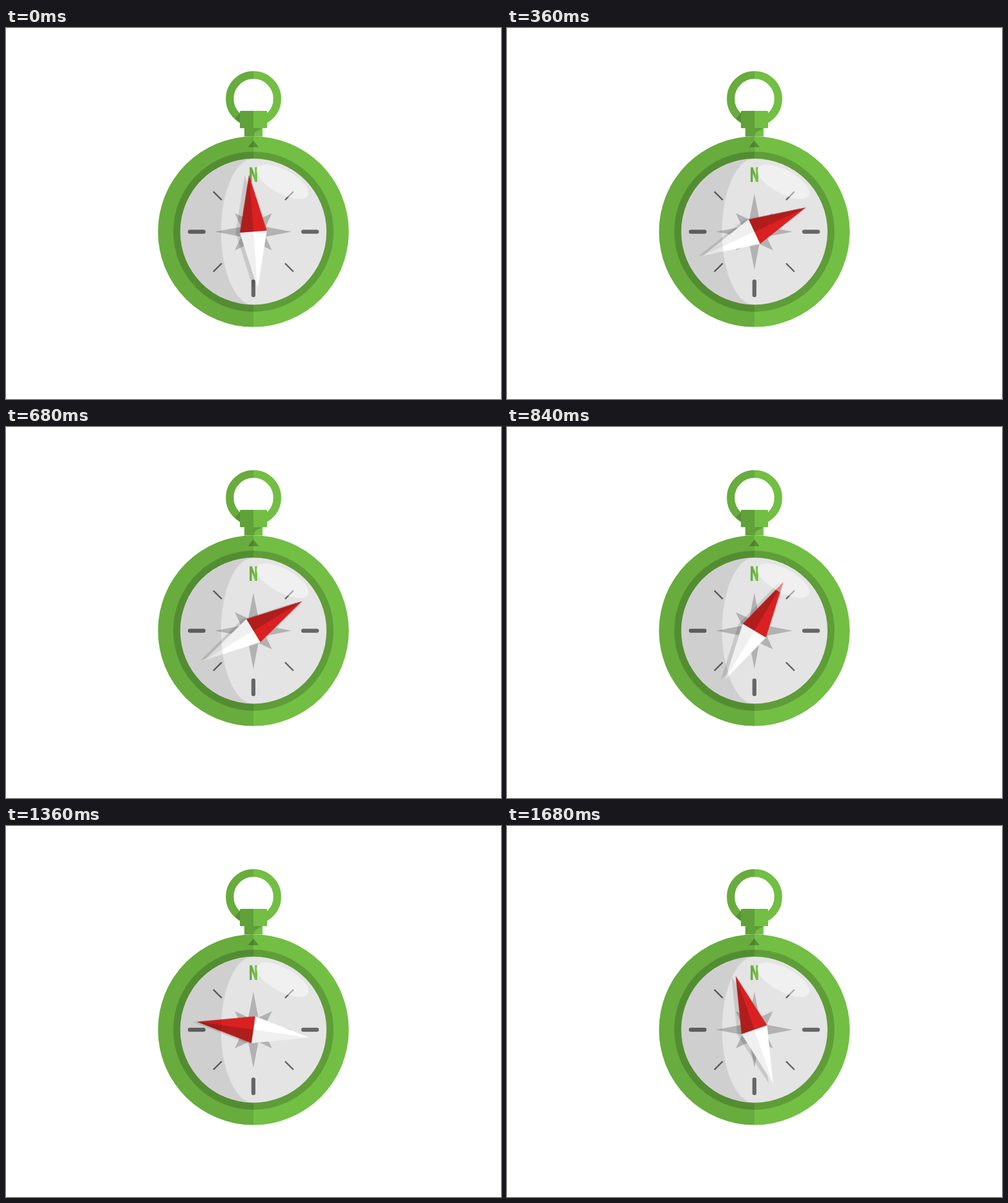
Animation of 800 by 600 pixels, one loop 1.72 s. Source, as an HTML page without scripts:

```html
<!DOCTYPE html>
<html lang="en">
<head>
<meta charset="utf-8">
<title>Compass</title>
<style>
  html, body { margin: 0; width: 100%; height: 100%; overflow: hidden; background: #fff; }
  svg { display: block; width: 800px; height: 600px; }

  /* Fast swing to the west, slower swing back to the east */
  .swing { animation: swing 1720ms -1268ms infinite; }
  @keyframes swing {
    0% { transform: rotate(66.6deg); animation-timing-function: cubic-bezier(.885, 0, .328, 1); }
    46.05% { transform: rotate(-84.9deg); animation-timing-function: cubic-bezier(.56, 0, .44, 1); }
    100% { transform: rotate(66.6deg); }
  }
</style>
</head>
<body>
<svg viewBox="0 0 800 600" role="img" aria-label="Compass with a swinging needle">
  <defs>
    <!-- Two-tone fills split down the middle -->
    <linearGradient id="green">
      <stop offset=".5" stop-color="#67ac3d"/><stop offset=".5" stop-color="#72bf44"/>
    </linearGradient>
    <linearGradient id="neck">
      <stop offset=".5" stop-color="#60a139"/><stop offset=".5" stop-color="#72bf44"/>
    </linearGradient>
    <linearGradient id="rim">
      <stop offset=".5" stop-color="#538d32"/><stop offset=".5" stop-color="#5e9d38"/>
    </linearGradient>
    <linearGradient id="mark">
      <stop offset=".5" stop-color="#4d812e"/><stop offset=".5" stop-color="#558f33"/>
    </linearGradient>
    <path id="tick" d="M51.2 51.2 64.7 64.7" stroke-width="2.5"/>
    <path id="bar" d="M80.6 0H102.6" stroke-width="6.5" stroke-linecap="round"/>
  </defs>

  <!-- Ring and neck -->
  <circle cx="400" cy="114.4" r="38.4" fill="none" stroke="url(#green)" stroke-width="12.7"/>
  <path d="M378 137.6 370 146.2 378 153.4Z" fill="#558f33"/>
  <path d="M385.2 161H414.6V175.5H385.2Z" fill="url(#neck)"/>
  <path d="M400 162H414.4L402 168.8 400 175.5Z" fill="#5e9d38"/>
  <rect x="378" y="134" width="44" height="28" rx="1.5" fill="url(#neck)"/>

  <g transform="translate(399.8 329.4)">
    <!-- Case -->
    <circle r="154.2" fill="url(#green)"/>
    <circle r="129.5" fill="url(#rim)"/>
    <path d="M0-147.4 8.6-136.6H-8.6Z" fill="url(#mark)"/>

    <!-- Dial -->
    <circle r="118.2" fill="#e4e4e4"/>
    <path d="M0-61.5 10-10 61.7 0 10 10 0 61.5-10 10-61.7 0-10-10ZM-30-30 0-16 30-30 16 0 30 30 0 16-30 30-16 0Z" fill="#b2b2b2"/>
    <g stroke="#666">
      <use href="#tick"/>
      <use href="#tick" transform="rotate(90)"/>
      <use href="#tick" transform="rotate(180)"/>
      <use href="#tick" transform="rotate(270)"/>
      <use href="#bar"/>
      <use href="#bar" transform="rotate(90)"/>
      <use href="#bar" transform="rotate(180)"/>
    </g>
    <path d="M-6.1-80.4V-104.2H-2.3L2.5-91V-104.2H6.2V-80.4H2.8L-2.5-95V-80.4Z" fill="url(#green)"/>

    <!-- Needle and its shadow -->
    <g transform="translate(-7 .4)">
      <path class="swing" d="M0-91.7 21.8 0 0 91.7-21.8 0Z" opacity=".12"/>
    </g>
    <g class="swing">
      <path d="M0-91.7 21.8 0H-21.8Z" fill="#da2020"/>
      <path d="M0-91.7V0H-21.8Z" fill="#b01d1d"/>
      <path d="M0 91.7 21.8 0H-21.8Z" fill="#fff"/>
      <path d="M0 91.7V0H-21.8Z" fill="#f0f0f0"/>
    </g>

    <!-- Glass shade and highlight -->
    <path d="M0-118.2A118.2 118.2 0 0 0 0 118.2A52.3 118.2 0 0 1 0-118.2Z" opacity=".09"/>
    <ellipse rx="47" ry="19" transform="translate(47 -80.8) rotate(28.5)" fill="#fff" opacity=".45"/>
  </g>
</svg>
</body>
</html>
```
